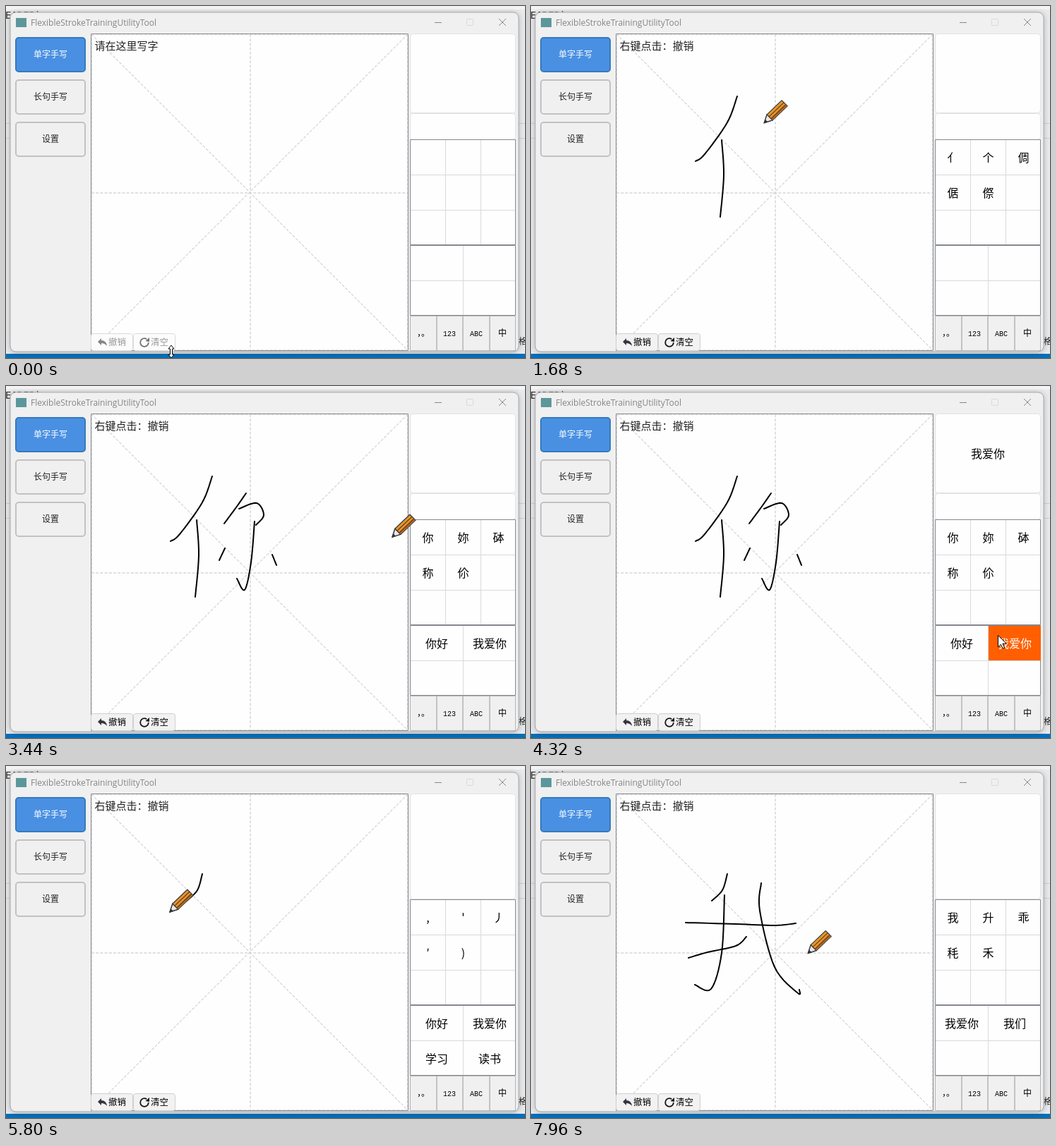
These frames come from a looping animation (735 by 499 pixels, 8 s). An HTML page with a canvas:

```html
<!DOCTYPE html>
<html lang="zh">
<head>
<meta charset="utf-8">
<title>Handwriting pad</title>
<style>
html, body { margin: 0; width: 100%; height: 100%; overflow: hidden; background: #e9eaec; }
canvas { display: block; width: 735px; height: 499px; }
</style>
</head>
<body>
<canvas id="stage" width="735" height="499"></canvas>
<script>
const ctx = document.getElementById('stage').getContext('2d');
const LOOP = 8000, CLEAR = 4880;
const CJK = '"Noto Sans CJK SC", "Noto Sans CJK", sans-serif';
const EDGE = '#85888f';

// Samples a smooth pen stroke through a few points as [t, x, y]
function stroke(t0, t1, ...xy) {
  const n = xy.length / 2, out = [], per = 8;
  const at = (i, k) => xy[2 * Math.max(0, Math.min(n - 1, i)) + k];
  const steps = (n - 1) * per;
  for (let s = 0; s <= steps; s++) {
    const i = Math.min(n - 2, Math.floor(s / per)), u = s / per - i;
    const f = k => {
      const a = at(i - 1, k), b = at(i, k), c = at(i + 1, k), d = at(i + 2, k);
      return b + u / 2 * (c - a + u * (2 * a - 5 * b + 4 * c - d + u * (3 * (b - c) + d - a)));
    };
    out.push([t0 + (t1 - t0) * s / steps, f(0), f(1)]);
  }
  return out;
}

const you = [
  stroke(600, 880, 292,128, 278,165, 246,210, 233,220),
  stroke(980, 1260, 270,190, 273,240, 268,299),
  stroke(1780, 1900, 340,152, 326,172, 309,195),
  stroke(1990, 2230, 330,174, 355,166, 365,183, 354,197),
  stroke(2320, 2570, 352,192, 347,250, 338,289, 327,273),
  stroke(2700, 2800, 310,230, 302,247),
  stroke(2960, 3090, 377,239, 383,254)
];
const me = [
  stroke(5650, 5745, 278,153, 271,176, 256,191),
  stroke(5980, 6360, 219,222, 290,224, 345,226, 375,223),
  stroke(6900, 7180, 274,183, 270,265, 255,316, 232,310),
  stroke(7400, 7520, 223,272, 250,264, 290,255, 305,242),
  stroke(7600, 7850, 326,166, 324,205, 345,285, 378,322, 380,317)
];

// Pointer positions between strokes: time, x, y
const enter = [[0,234,490], [40,234,490], [240,345,260], [340,320,118], [440,292,128]];
const pauses = [[1400,309,273], [1680,330,166], [2640,315,226], [3160,388,252]];
const pick = [[3400,530,215], [3560,596,212], [3720,598,262], [3960,612,360], [4160,664,356], [4320,661,353]];
const wipe = [[4430,656,360], [4480,651,393], [4540,540,405], [4760,191,481], [4960,191,481], [5520,278,153]];
const rest = [[5800,232,207], [5880,219,222], [6440,378,222], [6560,378,222], [6840,279,180], [7320,217,272], [7960,392,266], [8000,400,250]];
const track = [enter, pauses, pick, wipe, rest, ...you, ...me].flat().sort((a, b) => a[0] - b[0]);

// Recognition results: time, candidates, phrases
const RESULTS = [
  [0, '', []],
  [920, ",'丿′)", []],
  [1320, '亻个倜倨傺', []],
  [1960, '什仆化仁个', []],
  [2280, '仔们仃价俘', []],
  [2600, '竹仃价个俘', []],
  [2880, '你仔份俘称', ['你好', '我爱你']],
  [3200, '你妳砵称伱', ['你好', '我爱你']],
  [CLEAR, '', []],
  [5760, ",'丿′)", ['你好', '我爱你', '学习', '读书']],
  [6400, '亠人<L二', []],
  [7240, '才扌千手于', []],
  [7560, '升千牛手禾', []],
  [7900, '我升乖秏禾', ['我爱你', '我们']]
];

function pointer(t) {
  const i = Math.max(1, track.findIndex(k => k[0] > t));
  const a = track[i - 1], b = track[i];
  const u = (t - a[0]) / (b[0] - a[0] || 1);
  return [a[1] + (b[1] - a[1]) * u, a[2] + (b[2] - a[2]) * u];
}

function cells(t) {
  const [, chars, phrases] = RESULTS.filter(r => r[0] <= t).pop();
  return [
    ...[...chars].map((text, i) => ({ text, x: 573 + i % 3 * 50, y: 190 + Math.floor(i / 3) * 50, w: 49 })),
    ...phrases.map((text, i) => ({ text, x: 573 + i % 2 * 75, y: 340 + Math.floor(i / 2) * 50, w: 74 }))
  ];
}

function hovered(t) {
  const [x, y] = pointer(t);
  return cells(t).find(c => x >= c.x && x < c.x + c.w && y >= c.y && y < c.y + 49);
}

// The preview keeps the last hovered entry until the pad is cleared
function preview(t) {
  if (t >= CLEAR) return '';
  for (let s = t; s > 3200; s -= 20) {
    const c = hovered(s);
    if (c) return c.text;
  }
  return '';
}

function box(x, y, w, h, fill, line, r = 0, lw = 1) {
  ctx.beginPath();
  ctx.roundRect(x, y, w, h, r);
  if (fill) { ctx.fillStyle = fill; ctx.fill(); }
  if (line) { ctx.strokeStyle = line; ctx.lineWidth = lw; ctx.stroke(); }
}

function path(points, line, lw = 1, fill) {
  ctx.beginPath();
  points.forEach(([x, y], i) => i ? ctx.lineTo(x, y) : ctx.moveTo(x, y));
  if (fill) { ctx.closePath(); ctx.fillStyle = fill; ctx.fill(); }
  if (line) { ctx.strokeStyle = line; ctx.lineWidth = lw; ctx.stroke(); }
}

const seg = (x1, y1, x2, y2, line, lw) => path([[x1, y1], [x2, y2]], line, lw);

function label(s, x, y, size, color = '#000', align = 'center', font = CJK) {
  ctx.font = `${size}px ${font}`;
  ctx.fillStyle = color;
  ctx.textAlign = align;
  ctx.fillText(s, x, y + size * 0.37);
}

function backdrop() {
  box(0, 0, 735, 499, '#e9eaec');
  box(0, 0, 735, 5, '#f4f4f5');
  label('EADER)', -1, 13, 14, '#333', 'left', '"DejaVu Sans Mono", monospace');
  for (const y of [166.5, 187.5]) seg(0, y, 735, y, '#cfd0d2');
  box(0, 493, 735, 6, '#066fb9');
  label('格', 726, 476, 12, '#222', 'left');
  ctx.save();
  ctx.shadowColor = 'rgba(0,0,0,.28)';
  ctx.shadowBlur = 8;
  ctx.shadowOffsetY = 1;
  box(6, 9, 720, 481, '#f0f0f0', null, 8);
  ctx.restore();
  box(6, 9, 720, 481, null, '#a9a9a9', 8);
}

function chrome() {
  box(14, 17, 15, 13, '#5c979b');
  label('FlexibleStrokeTrainingUtilityTool', 35, 23.5, 12, '#858585', 'left', '"Open Sans", "Noto Sans", sans-serif');
  seg(607, 23.5, 617, 23.5, '#868686');
  box(652.5, 18.5, 9, 9, null, '#d9d9d9', 1);
  seg(698, 18, 708, 28, '#858585');
  seg(708, 18, 698, 28, '#858585');
  ['单字手写', '长句手写', '设置'].forEach((s, i) => {
    const y = 45 + i * 60;
    box(14, y, 98, 48, i ? '#f0f0f0' : '#4a90e2', i ? '#c2c2c2' : '#357abd', 4, 2);
    label(s, 63, y + 24, 12, i ? '#222' : '#fff');
  });
}

function pad() {
  box(120.5, 39.5, 449, 449, '#fefefe', EDGE);
  ctx.setLineDash([4, 2.2]);
  const line = '#d6d6d6';
  seg(346, 40, 346, 488, line, 1.5);
  seg(121, 265, 569, 265, line, 1.5);
  seg(121, 40, 569, 488, line, 1.3);
  seg(569, 40, 121, 488, line, 1.3);
  box(121.5, 40.5, 447, 447, null, '#dedede');
  ctx.setLineDash([]);
}

function toolButton(x, s, on) {
  box(x + .5, 464.5, 59, 24, on ? '#f2f2f2' : '#fcfcfc', on ? '#cfcfcf' : '#dadada', 3);
  label(s, x + 25, 476.5, 12.5, on ? '#000' : '#999', 'left');
}

function tools(on) {
  const ring = on ? '#151515' : '#707070';
  toolButton(120, '撤销', on);
  toolButton(180, '清空', on);
  ctx.beginPath();
  ctx.moveTo(130, 476);
  ctx.lineTo(135, 471);
  ctx.lineTo(135, 474);
  ctx.quadraticCurveTo(142, 474, 143, 482);
  ctx.quadraticCurveTo(140, 478, 135, 478);
  ctx.lineTo(135, 481);
  ctx.fillStyle = on ? '#35353f' : '#858585';
  ctx.fill();
  ctx.beginPath();
  ctx.arc(196, 477, 5.8, 0, 5.3);
  ctx.strokeStyle = ring;
  ctx.lineWidth = 1.8;
  ctx.stroke();
  path([[203, 470], [203, 476], [197.5, 475]], null, 1, ring);
}

function panel(t) {
  box(572.5, 39.5, 149, t < CLEAR ? 112 : 149, '#fefefe', '#e2e2e2', 4);
  if (t < CLEAR) box(572.5, 152.5, 149, 37, '#fefefe', '#e2e2e2', 4);
  label(preview(t), 647, 96, 16);
  box(572.5, 189.5, 149, 149, '#fefefe', EDGE);
  box(572.5, 339.5, 149, 99, '#fefefe', EDGE);
  const grid = '#d9d9d9';
  for (const d of [0, 50]) {
    seg(622.5 + d, 190, 622.5 + d, 338, grid);
    seg(573, 239.5 + d, 721, 239.5 + d, grid);
  }
  seg(647.5, 340, 647.5, 438, grid);
  seg(573, 389.5, 721, 389.5, grid);
  const hot = hovered(t);
  for (const c of cells(t)) {
    const on = hot && hot.x === c.x && hot.y === c.y;
    if (on) box(c.x, c.y, c.w, 49, '#ff5f00');
    label(c.text, c.x + c.w / 2, c.y + 25, 16, on ? '#fff' : '#000');
  }
  box(572.5, 439.5, 149, 49, '#f0f0f0', '#b4b4b4');
  for (const x of [610, 647, 685]) seg(x, 440, x, 488, '#b4b4b4', 1.5);
  const mono = '"Liberation Mono", monospace';
  label('，。', 591, 464, 12);
  label('123', 628, 464, 10, '#000', 'center', mono);
  label('ABC', 666, 464, 10, '#000', 'center', mono);
  label('中', 703, 464, 12);
}

function ink(t) {
  ctx.lineCap = ctx.lineJoin = 'round';
  for (const pts of t < CLEAR ? you : me) {
    if (t < pts[0][0]) continue;
    const shown = pts.filter(p => p[0] <= t).map(p => [p[1], p[2]]);
    if (t < pts[pts.length - 1][0]) shown.push(pointer(t));
    path(shown, '#000', 2);
  }
  ctx.lineCap = 'butt';
  ctx.lineJoin = 'miter';
}

function pencil() {
  const dark = '#3d3d44';
  path([[0, 0], [4, -12], [12, -4]], dark, 1.2, '#ece6df');
  path([[4, -12], [25, -32], [33, -24], [12, -4], [4, -12]], dark, 1.3, '#e99628');
  path([[9.5, -7], [30, -27], [32.5, -24], [12, -4.5]], null, 1, '#b86a1c');
  seg(7, -9, 28, -29, '#60432a', 1.3);
  seg(10, -6, 31, -26, '#60432a', 1.3);
  seg(0, 0, 4, -12, dark, 1.2);
  seg(0, 0, 12, -4, dark, 1.2);
  path([[0, 0], [1.5, -5], [5, -1.7]], null, 1, '#2f3038');
}

function arrow() {
  path([[.5, .5], [.5, 17], [4.5, 13.2], [7.2, 19], [9.6, 18], [7, 12.2], [12.2, 12.2], [.5, .5]], '#000', 1, '#fff');
}

function resizer() {
  const half = [[-1.5, 0], [-1.5, -4], [-4, -4], [0, -9], [4, -4], [1.5, -4], [1.5, 0]];
  path([...half, ...half.map(([x, y]) => [-x, -y])], '#000', 1, '#fff');
}

function cursor(t) {
  const [x, y] = pointer(t);
  ctx.save();
  ctx.translate(x, y);
  if (y > 488) resizer();
  else if (x > 570) arrow();
  else pencil();
  ctx.restore();
}

function draw(now) {
  const t = now % LOOP;
  backdrop();
  chrome();
  pad();
  label(t < 640 ? '请在这里写字' : '右键点击：撤销', 125.5, 56.5, 15, '#222', 'left');
  ink(t);
  tools((t >= 620 && t < CLEAR) || t >= 5660);
  panel(t);
  cursor(t);
}

const begin = performance.now();
function tick() {
  draw(performance.now() - begin);
  requestAnimationFrame(tick);
}
tick();
</script>
</body>
</html>
```
